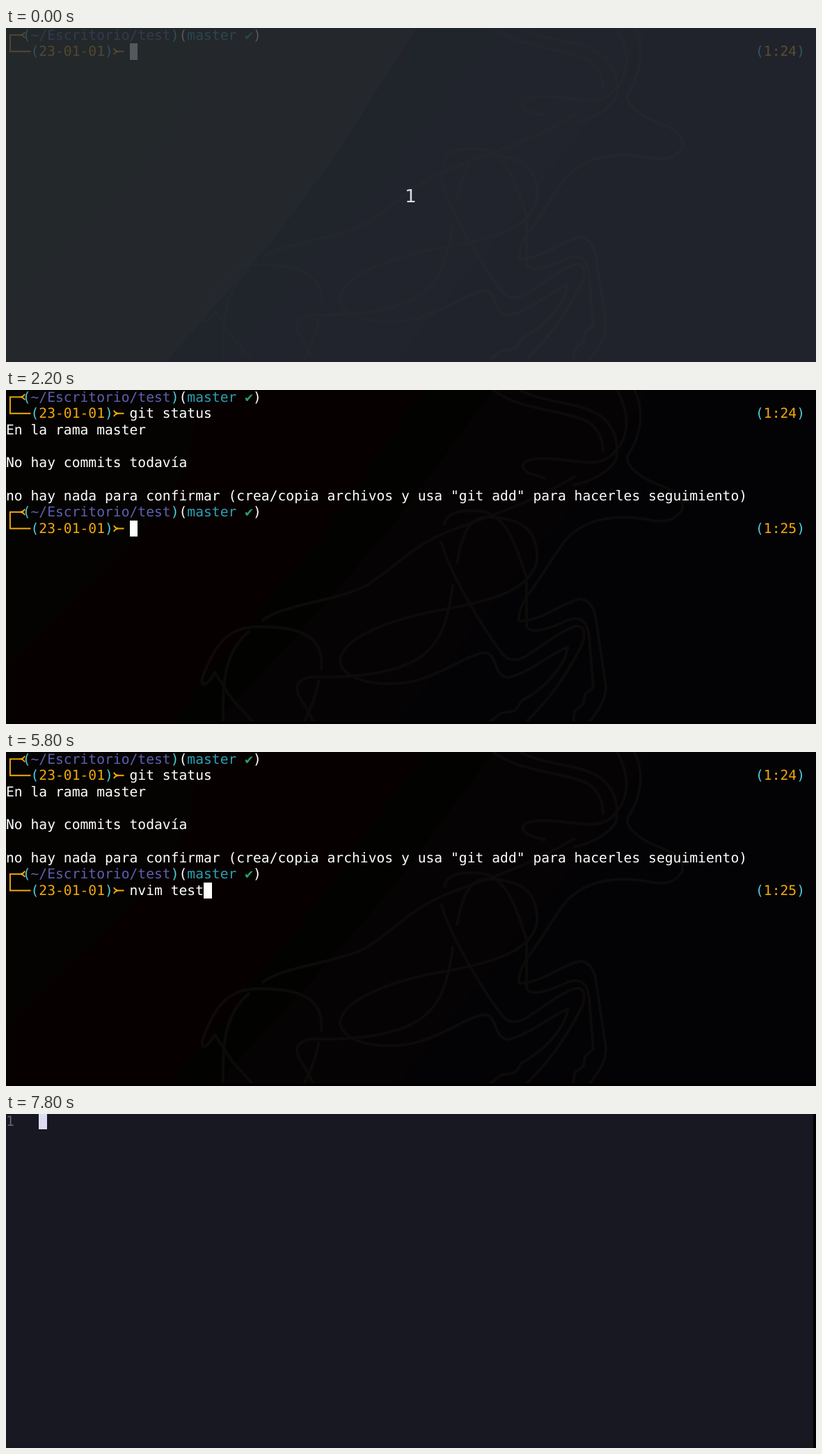
Write an HTML page that moves like this. It is 1164x481 px and loops after 8 s.

```html
<!DOCTYPE html>
<html lang="es">
<head>
<meta charset="utf-8">
<title>Terminal</title>
<style>
  html, body { margin: 0; width: 100%; height: 100%; overflow: hidden; background: #000; }
  svg { display: block; width: 100vw; height: 100vh; }
  text { font: 19.66px "DejaVu Sans Mono", monospace; fill: #fff; white-space: pre; text-rendering: geometricPrecision; }
  .art path { fill: none; stroke: #0d0b0a; stroke-width: 4; stroke-linejoin: round; }
  .frame { fill: none; stroke: #f3aa0a; stroke-width: 1.9; }
  #count { font: 26px "DejaVu Sans", sans-serif; fill: #dcd9e4; text-anchor: middle; }
</style>
</head>
<body>
<svg viewBox="0 0 1164 481">
  <g id="backdrop">
    <rect width="1164" height="481" fill="#030204"/>
    <path fill="#060304" d="M0 0H925L835 140L700 310L560 481H0Z"/>
    <path fill="#020300" d="M0 0H700L560 190L430 340L300 481H0Z"/>
    <path fill="#070000" d="M0 0H600L470 190L380 300L235 481H0Z"/>
    <path fill="#040301" d="M0 0H270V60C262 140 190 220 100 300L0 400Z"/>
    <g class="art">
      <path d="M368 332C400 308 470 305 515 283C555 260 580 225 640 202C700 180 760 160 818 124"/>
      <path d="M700 0C740 30 800 28 835 45C855 58 858 75 858 90"/>
      <path d="M738 0C780 22 830 15 860 42C875 58 880 72 877 100C865 120 840 132 815 137"/>
      <path d="M878 0C900 40 895 75 865 98C840 112 810 98 775 99C740 98 735 110 752 120L775 127"/>
      <path d="M903 0C918 30 912 65 896 90C885 105 905 120 925 131C950 143 975 145 972 172C960 190 945 190 930 188C890 180 840 178 805 215C785 240 770 270 750 295C740 310 736 322 737 333"/>
      <path d="M737 333C770 333 800 305 827 301C845 305 848 325 850 345L862 425C863 445 850 465 835 481"/>
      <path d="M748 275V340C755 355 790 340 808 331C828 325 836 335 838 355L844 428L832 438L830 452L817 462L815 481"/>
      <path d="M630 195C632 175 655 172 685 175C720 180 735 230 748 270"/>
      <path d="M625 218C640 270 690 350 715 382C725 392 740 390 755 378C780 362 800 345 820 340C835 340 832 358 825 372C800 420 780 445 745 481"/>
      <path d="M648 250C655 210 665 180 695 183C740 185 765 200 763 245C755 290 690 305 630 316C560 328 480 355 480 392C488 425 560 430 600 415C640 402 665 380 690 378C708 385 700 412 722 414C750 408 775 385 807 370C805 395 775 430 740 448C730 470 725 460 710 466L695 478"/>
      <path d="M642 280C635 340 620 370 590 388C550 412 480 415 440 413C410 418 415 435 430 455L442 478"/>
      <path d="M453 403C458 360 430 340 365 341C320 340 300 365 282 415C280 430 290 425 300 407L312 425C325 450 340 460 354 478"/>
      <path d="M350 347C310 380 312 430 312 478M450 417C445 440 440 455 428 478"/>
    </g>
    <rect y="477" width="1164" height="4" fill="#040002"/>
  </g>
  <g id="shell"></g>
  <g id="editor">
    <rect width="1164" height="481" fill="#000"/>
    <rect width="1160" height="481" fill="#181822"/>
    <rect y="477" width="1160" height="4" fill="#1a1520"/>
  </g>
  <rect id="cursor"/>
  <g id="dim">
    <rect width="1164" height="481" fill="#2b2f39" opacity=".76"/>
    <path d="M0 0H590L470 190L380 310L230 481H0Z" fill="#2d3a30" opacity=".18"/>
    <text id="count" x="581.5" y="250.5">1</text>
  </g>
</svg>
<script>
const LOOP = 8000, COL = 11.835, ROW = 23.67, TOP = -1.7, BASE = 16.8, START = 15;
const CYAN = '#4fcbd8', GOLD = '#f3aa0a';
const OUTPUT_AT = 2200, RUN_AT = 7600, CLEAR_AT = 7700, EDIT_AT = 7800;

const $ = id => document.getElementById(id);

function add(parent, tag, attrs, content = '') {
  const el = document.createElementNS('http://www.w3.org/2000/svg', tag);
  for (const k in attrs) el.setAttribute(k, attrs[k]);
  el.textContent = content;
  return parent.appendChild(el);
}

const write = (parent, row, col, str, fill = '#fff') =>
  add(parent, 'text', { x: col * COL, y: BASE + row * ROW, style: `fill:${fill}` }, str);

// Two-line prompt with its clock; returns the text element for the command.
function prompt(parent, row, clock) {
  add(parent, 'path', {
    class: 'frame',
    transform: `translate(0 ${row * ROW})`,
    d: 'M20 10.1H5.9V33.8H35.5' +
       'M27 5.8Q25 10.1 19.5 10.1Q25 10.1 27 14.4' +
       'M155 29.5Q157 33.8 162.5 33.8Q157 33.8 155 38.1M161 33.8H169.5'
  });
  const line = (r, col, parts) => {
    for (const [str, fill] of parts) {
      write(parent, r, col, str, fill);
      col += str.length;
    }
  };
  line(row, 2, [['(', CYAN], ['~/Escritorio/test', '#5f5faf'], [')', CYAN],
                ['(', '#fff'], ['master', '#2aa1b3'], [' ', '#fff'], ['✔', '#26a269'], [')', '#fff']]);
  line(row + 1, 3, [['(', CYAN], ['23-01-01', GOLD], [')', CYAN]]);
  line(row + 1, 91, [['(', CYAN], [clock, GOLD], [')', CYAN]]);
  return write(parent, row + 1, START, '');
}

const shell = $('shell');
const first = {
  row: 1, text: 'git status', el: prompt(shell, 0, '1:24'),
  keys: [300, 400, 500, 700, 1200, 1400, 1500, 1700, 1800, 1900]
};
const output = add(shell, 'g', {});
write(output, 2, 0, 'En la rama master');
write(output, 4, 0, 'No hay commits todavía');
write(output, 6, 0, 'no hay nada para confirmar (crea/copia archivos y usa "git add" para hacerles seguimiento)');
const second = {
  row: 8, text: 'nvim test.test', el: prompt(output, 7, '1:25'),
  keys: [4000, 4200, 4300, 4400, 4700, 5200, 5500, 5600, 5800, 6600, 6700, 6800, 7000, 7300]
};
write($('editor'), 0, 0, '1', '#626478');

const show = (el, on) => el.setAttribute('display', on ? 'inline' : 'none');

function type(cmd, t) {
  const n = cmd.keys.filter(k => k <= t).length;
  cmd.el.textContent = cmd.text.slice(0, n);
  return n;
}

function placeCursor(row, col, fill = '#fff') {
  const y = Math.max(0, Math.round(TOP + row * ROW));
  const x = Math.round(col * COL);
  const attrs = { x, y, fill,
    width: Math.round((col + 1) * COL) - x,
    height: Math.round(TOP + (row + 1) * ROW) - y };
  for (const k in attrs) $('cursor').setAttribute(k, attrs[k]);
}

function draw(t) {
  show($('dim'), t < 100);
  show(shell, t < CLEAR_AT);
  show(output, t >= OUTPUT_AT);
  show($('editor'), t >= EDIT_AT);

  const counts = [type(first, t), type(second, t)];
  if (t >= EDIT_AT) placeCursor(0, 4, '#dcdcf5');
  else if (t >= CLEAR_AT) placeCursor(0, 0);
  else if (t >= RUN_AT) placeCursor(9, 0);
  else if (t >= OUTPUT_AT) placeCursor(second.row, START + counts[1]);
  else placeCursor(first.row, START + counts[0]);
}

function tick() {
  draw(performance.now() % LOOP);
  requestAnimationFrame(tick);
}
tick();
</script>
</body>
</html>
```
